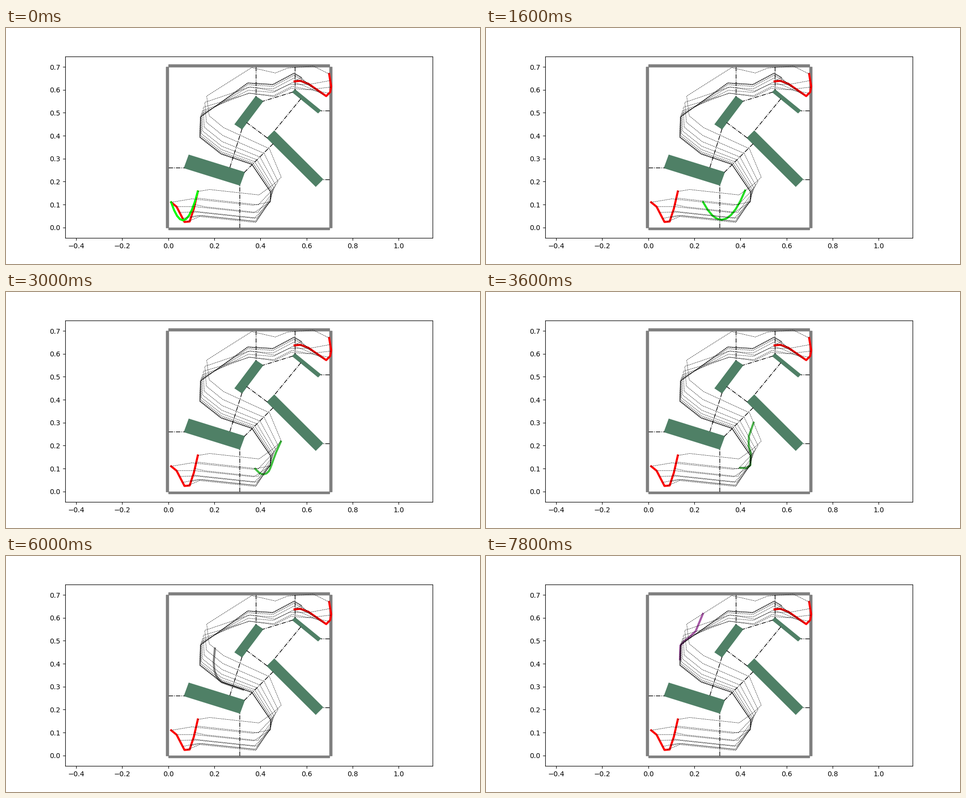
Animation, 960 px wide and 480 px high, one loop 8 s. Source, as a matplotlib script:

```python
import numpy as np
import matplotlib.pyplot as plt
from matplotlib.animation import FuncAnimation
from matplotlib.patches import Polygon, Rectangle

STEPS = 40
FADE_STEPS = 60
U = np.linspace(0, 1, 10)  # position of each node along the chain
SCALE = 369.6 / 0.792  # pixels per data unit


def to_data(px):
    """Stage pixels (y down) to axes coordinates."""
    px = np.asarray(px, float) + 0.5
    return np.stack([(px[..., 0] - 328.67) / SCALE,
                     (405.73 - px[..., 1]) / SCALE], axis=-1)


def spaced(points):
    """Nodes spread evenly along a polyline."""
    pts = np.array(points, float)
    dist = np.append(0, np.hypot(*np.diff(pts, axis=0).T).cumsum())
    return np.stack([np.interp(U * dist[-1], dist, c) for c in pts.T], axis=1)


def box(x, y, side, end):
    """Corners of a parallelogram from one corner and two edges."""
    p, a, b = np.array([x, y]), np.array(side), np.array(end)
    return np.array([p, p + a, p + a + b, p + b])


def nearest(p, q):
    """Closest pair of points on two outlines, the first one on p."""
    pairs = []
    for a, b, flip in ((p, q, False), (q, p, True)):
        for v in a:
            for s, e in zip(b, np.roll(b, -1, axis=0)):
                t = np.clip((v - s) @ (e - s) / ((e - s) @ (e - s)), 0, 1)
                foot = s + t * (e - s)
                pairs.append((foot, v) if flip else (v, foot))
    return min(pairs, key=lambda pair: np.hypot(*(pair[0] - pair[1])))


START = [(334, 354), (345, 363), (361, 394), (371.5, 393), (380, 367), (388, 332)]
GOAL = [(584, 108), (596, 107), (612, 113), (648, 138),
        (656, 130), (658, 118), (654, 93)]

# Bends in the routes of the two chain ends
TAIL = [(376, 347), (500, 360), (535, 353), (535, 333), (497, 277), (435, 256),
        (392, 222), (393, 181), (489, 111), (540, 114), (583, 91), (598, 100)]
HEAD = [(412, 328), (512, 339), (541, 318), (557, 303), (533, 245), (440, 202),
        (411, 178), (406, 138), (497, 80), (545, 91), (570, 81), (622, 77)]

# Progress of both ends, counted in bends passed
KEY_STEPS = [0, 4, 11, 18, 24, 30, 39]
TAIL_AT = [0, 1.19, 1.75, 2.4, 4.7, 5.28, 7.3]
HEAD_AT = [0, 1.65, 3.0, 4.65, 5.75, 6.6, 8.36]


def routes(power):
    """Every node's place at every bend; a higher power keeps them closer."""
    rows = [spaced(START)]
    for j, (tail, head) in enumerate(zip(np.array(TAIL), np.array(HEAD))):
        low, top = j < 2, j >= 8
        w = U if low else U ** power
        row = tail + np.outer(w, head - tail)
        row[:, 1] += (45 * low + 36 * top) * 4 * w * (1 - w)
        rows.append(row)
    return np.array(rows + [spaced(GOAL)])


plan, track = routes(3), routes(6)


def pose(step):
    tail = np.interp(step, KEY_STEPS, TAIL_AT)
    head = np.interp(step, KEY_STEPS, HEAD_AT)
    at = tail + (head - tail) * U ** 0.8
    j, i = at.astype(int), np.arange(len(U))
    f = (at - j)[:, None]
    follow = track[j, i] * (1 - f) + track[j + 1, i] * f

    # At first the chain hangs as a bow between its ends
    bow = follow[0] + np.outer(U, follow[-1] - follow[0])
    bow[:, 1] += 47 * 4 * U * (1 - U)
    hang = np.interp(step, [11, 18], [1, 0])
    return hang * bow + (1 - hang) * follow


SIZE = 0.7
WALLS = [(-0.01, 0, 0.01, SIZE), (SIZE, 0, 0.01, SIZE),
         (0, -0.01, SIZE, 0.01), (0, SIZE, SIZE, 0.01)]
BLOCKS = {
    "a": box(0.07, 0.26, (0.02, 0.055), (0.24, -0.075)),
    "b": box(0.29, 0.45, (0.03, -0.02), (0.09, 0.12)),
    "c": box(0.43, 0.39, (0.03, 0.03), (0.21, -0.21)),
    "d": box(0.54, 0.59, (0.01, 0.01), (0.11, -0.09)),
}
SIDES = {
    "left": np.array([(0, 0), (0, SIZE)]),
    "right": np.array([(SIZE, 0), (SIZE, SIZE)]),
    "bottom": np.array([(0, 0), (SIZE, 0)]),
    "top": np.array([(0, SIZE), (SIZE, SIZE)]),
}
GATES = ["left a", "bottom a", "right c", "right d", "top b", "top d",
         "d c", "d b", "c b", "c a", "b a"]

fig, ax = plt.subplots(figsize=(9.6, 4.8), dpi=100)
ax.axis("equal")

for x, y, w, h in WALLS:
    ax.add_patch(Rectangle((x, y), w, h, fc="gray", ec="gray", lw=1))
for block in BLOCKS.values():
    ax.add_patch(Polygon(block, color=(0.31, 0.5, 0.4), lw=1.5))
outlines = {**SIDES, **BLOCKS}
for gate in GATES:
    p, q = (outlines[name] for name in gate.split())
    ax.plot(*zip(*nearest(p, q)), "k-.", lw=1)
for shape in (START, GOAL):
    ax.plot(*to_data(shape).T, color="red", lw=3, zorder=3)
for i in range(len(U)):
    ax.plot(*to_data(plan[:, i]).T, "k--", lw=0.5, zorder=5)

chain, = ax.plot([], [], lw=3, zorder=4)


def draw(step):
    chain.set_data(*to_data(pose(step)).T)
    f = step / FADE_STEPS
    chain.set_color((f, 1 - f, f))
    return chain,


anim = FuncAnimation(fig, draw, frames=STEPS, interval=200,
                     repeat=True, repeat_delay=0)
plt.show()
```
